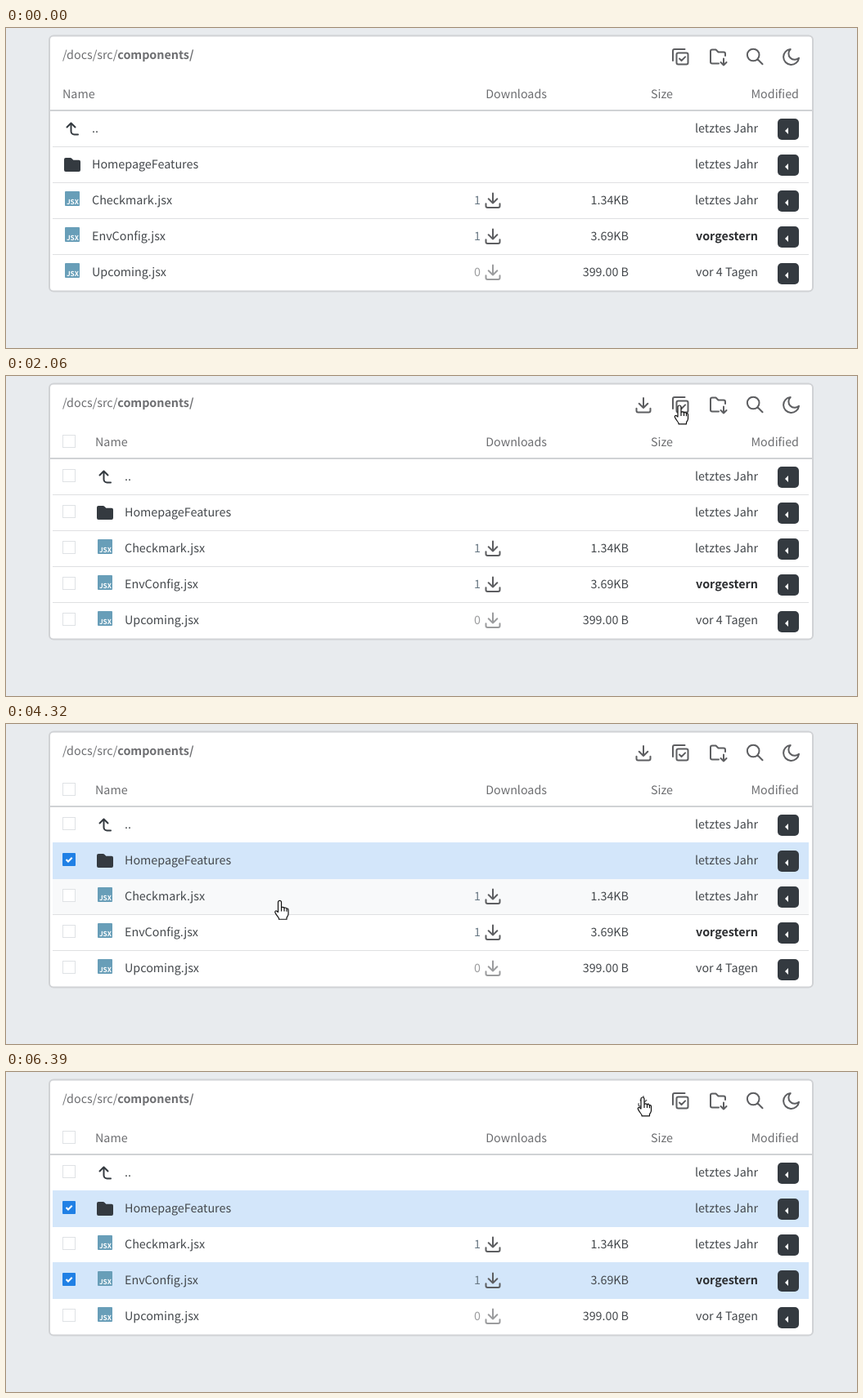
An HTML page that plays this animation: 1040x392 px, repeating every 7.39 s.

```html
<!DOCTYPE html>
<html lang="de">
<head>
<meta charset="utf-8">
<title>File list</title>
<style>
  html, body { margin: 0; width: 100%; height: 100%; overflow: hidden; background: #e8ebee; }
  svg { display: block; width: 1040px; height: 392px; }
  text {
    font: 14.32px "Noto Sans CJK JP", "Noto Sans CJK SC", "Noto Sans", sans-serif;
    text-rendering: geometricPrecision; white-space: pre; fill: #44484c;
  }
  .head, .path { fill: #6d6e71; }
  .bold { font-weight: 700; }
  .end { text-anchor: end; }
  .line { fill: none; stroke: #5d5e61; stroke-width: 2; stroke-linecap: round; stroke-linejoin: round; }
  .dark { stroke: #343a40; }
  .faint { stroke: #9b9c9e; }
</style>
</head>
<body>
<svg id="stage" viewBox="0 0 1040 392"></svg>
<script>
const LOOP = 7390, MODE_AT = 1530, PRESS_AT = 6390;
const TOP = 101, ROW = 44;

const rows = [
  { icon: 'up', name: '..', date: 'letztes Jahr' },
  { icon: 'folder', name: 'HomepageFeatures', date: 'letztes Jahr', checkAt: 3930 },
  { icon: 'jsx', name: 'Checkmark.jsx', hits: 1, size: '1.34KB', date: 'letztes Jahr' },
  { icon: 'jsx', name: 'EnvConfig.jsx', hits: 1, size: '3.69KB', date: 'vorgestern', strong: true, checkAt: 4920 },
  { icon: 'jsx', name: 'Upcoming.jsx', hits: 0, size: '399.00 B', date: 'vor 4 Tagen' }
];
const heads = [
  { id: 'hits', label: 'Downloads', end: 661, from: 560 },
  { id: 'size', label: 'Size', end: 815, from: 680 },
  { id: 'date', label: 'Modified', end: 969, from: 895 }
];

// Screen updates: first time, last time, number of steps
const runs = [
  [130, 860, 12], [930, 1330, 7], [1530, 1530, 1], [2860, 3590, 12], [3930, 4590, 10],
  [4920, 4990, 2], [5260, 5990, 12], [6050, 6120, 2], [6390, 6390, 1]
];
// Pointer path: time, x, y
const path = [
  [130, 884, 386], [260, 876, 350], [400, 856, 285], [600, 824, 150], [730, 820, 115],
  [930, 816, 63], [1100, 819, 47], [1330, 823, 36], [2790, 823, 36], [2860, 796, 52],
  [2925, 694, 84], [2990, 648, 91.5], [3130, 530, 114], [3330, 425, 150], [3590, 375, 167],
  [3990, 375, 167], [4200, 350, 200], [4400, 318, 234], [4590, 282, 250.5], [5190, 282, 250.5],
  [5260, 298, 245], [5390, 420, 198], [5525, 616, 131], [5650, 690, 112], [5800, 740, 80], [5990, 778, 31]
];

const text = (x, y, s, cls = '', more = '') => `<text x="${x}" y="${y}" class="${cls}" ${more}>${s}</text>`;
const rect = (x, y, w, h, fill, more = '') =>
  `<rect x="${x}" y="${y}" width="${w}" height="${h}" fill="${fill}" ${more}/>`;
const line = (d, cls = '', more = '') => `<path class="line ${cls}" d="${d}" ${more}/>`;
const group = (id, body, more = '') => `<g id="${id}" ${more}>${body}</g>`;

// Drawn around the top of the stem
const download = (x, y, cls) => line(
  `M${x} ${y}v12m-5.3-5.3l5.3 5.3 5.3-5.3M${x - 8.5} ${y + 12.8}v2.7a2 2 0 0 0 2 2h13a2 2 0 0 0 2-2v-2.7`, cls);

const icons = {
  up: y => line(`M88 ${y + 29.5}h-4.5a4 4 0 0 1-4-4V${y + 15.5}m-5 5l5-5 5 5`, 'dark'),
  folder: y => `<path fill="#343a40" d="M73 ${y + 14}h5.6q1 0 1.7.7l2 2H89a2 2 0 0 1 2 2V${y + 29}a2 2 0 0 1-2 2H73a2 2 0 0 1-2-2V${y + 16}a2 2 0 0 1 2-2z"/>`,
  jsx: y => rect(72, y + 11, 18, 18, '#689eb8', 'rx="1"') +
    text(89, y + 27.2, 'JSX', 'bold end', 'style="font-size:8.3px;fill:#fff"')
};

function box(id, y) {
  return rect(69.5, y - 7.5, 15, 15, '#fff', 'stroke="#dfe2e5"') +
    group(id, rect(69, y - 8, 16, 16, '#2080e5', 'rx="1"') +
      '<path d="M73.5 ' + y + 'l2.5 2.5 4.7-4.7" fill="none" stroke="#fff" stroke-width="2"/>');
}

function rowView(r, i) {
  const y = TOP + ROW * i, base = y + 27, by = Math.round(111 + 44.15 * i);
  let s = group('label' + i, icons[r.icon](y) + text(105, base, r.name));
  if (r.size) {
    s += text(580, base, r.hits, 'end', `style="fill:${r.hits ? '#697985' : '#9b9c9e'}"`) +
      download(595, y + 13.5, r.hits ? '' : 'faint') + text(761, base, r.size, 'end');
  }
  s += text(919, base, r.date, r.strong ? 'end bold' : 'end', r.strong ? 'style="fill:#2d2f32"' : '');
  return s + rect(943, by, 26, 26, '#343a40', 'rx="5"') +
    `<path fill="#fff" d="M956 ${by + 11}v8l-4-4z"/>`;
}

const tools =
  group('save', download(779, 27)) +
  line('M815 40V28a2 2 0 0 1 2-2h12.5M821.5 30.5h10a2 2 0 0 1 2 2v10a2 2 0 0 1-2 2h-10a2 2 0 0 1-2-2v-10a2 2 0 0 1 2-2zM823 37.5l2.5 2.5 4.6-4.6') +
  line('M871 43.5h-8a2 2 0 0 1-2-2V28.500a2 2 0 0 1 2-2h4.500l3 3h6.500a2 2 0 0 1 2 2v2.500M877 37.500v8m-3.500-3.500l3.500 3.500 3.500-3.500') +
  line('M920.500 33a7.300 7.300 0 1 1-14.600 0a7.300 7.300 0 1 1 14.600 0M918.500 38.300l6 6') +
  line('M969 36.800A9.500 9.500 0 1 1 958.700 26a7.400 7.400 0 0 0 10.300 10.800z');

const headView = h => text(h.end, 86, h.label, 'head end', `id="${h.id}"`) +
  line(`M${h.end - 11} 87V76.500m-3 3l3-3 3 3M${h.end - 5} 76.500V87m-3-3l3 3 3-3`, '',
    `id="${h.id}Sort" style="stroke-width:1.4"`);

const stage = document.getElementById('stage');
stage.innerHTML =
  rect(0, 0, 1040, 392, '#e8ebee') +
  rect(53, 9.5, 933, 313, '#fff', 'rx="5" stroke="#d0d2d5" stroke-width="2"') +
  text(69, 38, '/docs/src/<tspan class="bold">components/</tspan>', 'path') + tools +
  text(69, 86, 'Name', 'head', 'id="name"') + heads.map(headView).join('') +
  rows.map((r, i) => rect(57, TOP + ROW * i, 924, ROW, '#f8f9fa', `id="hover${i}"`)).join('') +
  rows.slice(1).map((r, i) => rect(57, TOP + ROW * (i + 1), 924, 1, '#dfe0e2')).join('') +
  rows.map((r, i) => rect(57, TOP + ROW * i, 924, ROW + 1, '#d3e6fa', `id="picked${i}"`)).join('') +
  rect(53, 100, 933, 2, '#d0d2d5') +
  rows.map(rowView).join('') +
  group('boxes', box('checkAll', 80) + rows.map((r, i) => box('check' + i, TOP + 21 + ROW * i)).join('')) +
  group('pointer',
    '<path id="arrow" d="M0 0V16.500l3.800-3.500 2.600 6 2.500-1.100-2.600-5.900h5.200z"/>' +
    '<path id="hand" d="M-2 14V2a2 2 0 0 1 4 0v7c0-1.500 3.500-1.500 3.500 .5 0-1.500 3-1.200 3 .8 0-1.200 2-1 2 1v5c0 2-1.500 3.500-2 4.500v2h-9.500v-1c-1-2-3-4-4.500-7-1-2 1-3 2-2zM2 9v4M5.500 9.500v3.500M8.500 10.300v3"/>',
    'fill="#fff" stroke="#111" stroke-width="1.2" stroke-linejoin="round"');

const el = id => document.getElementById(id);
const show = (id, on) => el(id).setAttribute('display', on ? 'inline' : 'none');
const move = (id, x, y = 0) => el(id).setAttribute('transform', `translate(${x} ${y})`);

// Time of the latest screen update
function heldTime(t) {
  let held = 0;
  for (const [a, b, n] of runs) {
    if (t < a) break;
    const gap = n > 1 ? (b - a) / (n - 1) : 1;
    held = a + Math.min(n - 1, Math.floor((t - a) / gap + 0.1)) * gap;
  }
  return held;
}

function pointerAt(t) {
  const k = path.findIndex(p => p[0] > t);
  if (k < 0) return path[path.length - 1].slice(1);
  if (k === 0) return [-99, -99];
  const [a, ax, ay] = path[k - 1], [b, bx, by] = path[k];
  const u = (t - a) / (b - a);
  return [ax + (bx - ax) * u, ay + (by - ay) * u];
}

function draw(t) {
  const [x, y] = pointerAt(heldTime(t));
  const mode = t >= MODE_AT;
  const inList = x > 57 && x < 981 && y > TOP && y < 321;
  const over = inList ? Math.floor((y - TOP) / ROW) : -1;
  let link = inList || (x > 765 && x < 972 && y > 22 && y < 48);

  for (const h of heads) {
    const on = x > h.from && x < h.end && y > 62 && y <= TOP;
    link = link || on;
    move(h.id, on ? -16 : 0);
    show(h.id + 'Sort', on);
  }
  rows.forEach((r, i) => {
    const checked = t >= r.checkAt;
    move('label' + i, mode ? 40 : 0);
    show('check' + i, checked);
    show('hover' + i, over === i);
    show('picked' + i, checked && over !== i);
  });
  move('name', mode ? 40 : 0);
  show('checkAll', false);
  show('boxes', mode);
  show('save', mode);
  el('save').setAttribute('transform',
    t >= PRESS_AT ? 'translate(779 36) scale(.7) translate(-779 -36)' : '');
  move('pointer', x, y);
  show('hand', link);
  show('arrow', !link);
}

function tick() {
  draw(performance.now() % LOOP);
  requestAnimationFrame(tick);
}
tick();
</script>
</body>
</html>
```
